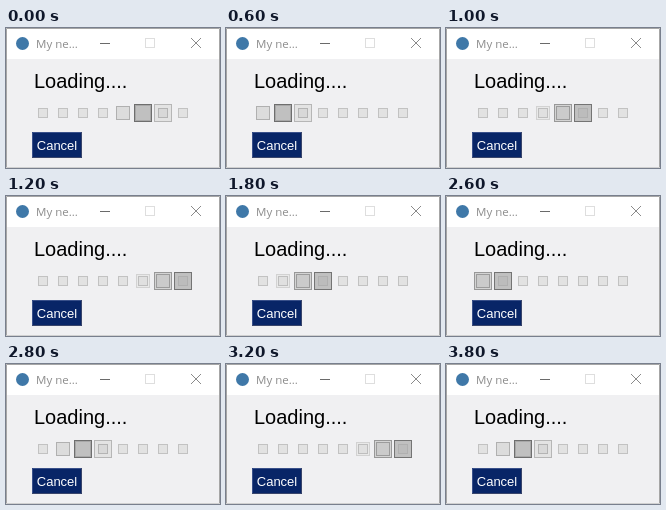
An HTML page that plays this animation: 214 px wide and 140 px high, repeating every 4000 ms.

```html
<!DOCTYPE html>
<html lang="en">
<head>
<meta charset="utf-8">
<title>Loading</title>
<style>
  html, body { margin: 0; width: 100%; height: 100%; overflow: hidden; background: #f0f0f2; }
  svg { display: block; width: 214px; height: 140px; }
  .title { font: 11.5px "Open Sans", "Noto Sans", sans-serif; fill: #8c8c8c; }
  .label { font: 20px "Liberation Sans", Arial, sans-serif; fill: #000; }
  .button { font: 13px "Liberation Sans", Arial, sans-serif; fill: #fff; text-anchor: middle; }
</style>
</head>
<body>
<svg viewBox="0 0 214 140">
  <rect width="214" height="140" fill="#f0f0f2"/>
  <rect width="214" height="31" fill="#fff"/>
  <path d="M.5 140V.5H213.5V140" fill="none" stroke="#a6a6a6"/>
  <path d="M0 139.5H214" stroke="#d0d0d0"/>

  <circle cx="16.5" cy="15.5" r="6.5" fill="#3f78a8"/>
  <text class="title" x="30" y="19.5">My ne...</text>
  <path d="M94 15.5h10" stroke="#6a6a6a"/>
  <rect x="139.5" y="10.5" width="9" height="9" fill="none" stroke="#dedede"/>
  <path d="M185 10l10 10m0-10l-10 10" stroke="#8a8a8a"/>

  <text class="label" x="28" y="60">Loading....</text>
  <g id="bar"></g>

  <rect x="26" y="104" width="50" height="26" fill="#082567"/>
  <path d="M26.5 130V104.5H76" fill="none" stroke="#39508a"/>
  <path d="M26 129.5H75.5V104" fill="none" stroke="#39456b"/>
  <text class="button" x="51" y="122">Cancel</text>
</svg>
<script>
const COUNT = 8, CYCLE = 19, STEP_MS = 200;
// Position of the pulse at each step, in half squares
const STEPS = [10, 14, 18, 2, 6, 9, 13, 17, 1, 5, 9, 12, 16, 1, 4, 8, 13, 17, 1, 4];

// Layers of a square: [size, fill, stroke]
const REST = [10, '#e2e2e2', '#c2c2c2'];
const STAGES = [
  [[18, '#e3e3e3', '#b6b6b6'], [10, '#d8d8d8', '#b4b4b4']],
  [[18, '#c0c0c0', '#747474'], [10, '#bcbcbc', '#b0b0b0']],
  [[18, '#c0c0c0', '#6e6e6e'], [16, '#c0c0c0', '#a8a8a8']],
  [[18, '#d4d4d4', '#989898'], [14, '#cbcbcb', '#9c9c9c']],
  [[14, '#dcdcdc', '#b0b0b0']],
  [[14, '#e9e9e9', '#d2d2d2'], [10, '#e0e0e0', '#bebebe']]
];

const bar = document.getElementById('bar');

function layer([size, fill, stroke], cx) {
  const x = cx - size / 2 + 0.5, y = 85 - size / 2 + 0.5, side = size - 1;
  return `<rect x="${x}" y="${y}" width="${side}" height="${side}" fill="${fill}" stroke="${stroke}"/>`;
}

function square(i, head) {
  // The pulse enters a square two half steps before its peak
  const age = (head - 2 * i + 2 + CYCLE) % CYCLE;
  const layers = STAGES[age] || [REST];
  return layers.map(l => layer(l, 37 + 20 * i)).join('');
}

let shown = -1;
function draw() {
  const step = Math.floor(performance.now() / STEP_MS) % STEPS.length;
  if (step !== shown) {
    shown = step;
    bar.innerHTML = Array.from({ length: COUNT }, (_, i) => square(i, STEPS[step])).join('');
  }
  requestAnimationFrame(draw);
}
draw();
</script>
</body>
</html>
```
